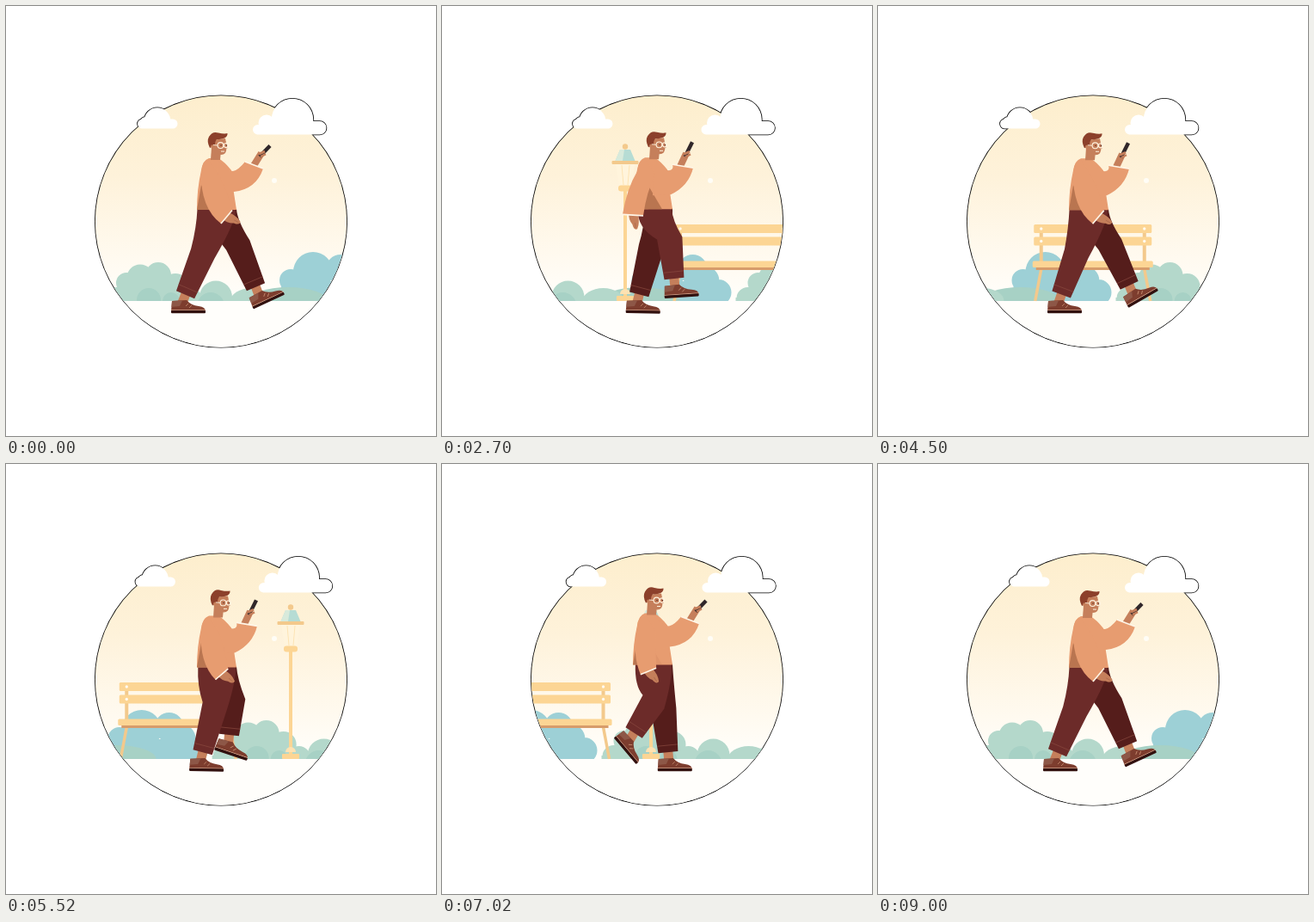
Animation, 500 px wide and 500 px high, one loop 9.03 s. Source, as an HTML page with a canvas:

```html
<!DOCTYPE html>
<html lang="en">
<head>
<meta charset="utf-8">
<title>Walk in the park</title>
<style>
html, body { margin: 0; width: 100%; height: 100%; overflow: hidden; background: #fff; }
canvas { display: block; width: 500px; height: 500px; }
</style>
</head>
<body>
<canvas id="stage" width="500" height="500"></canvas>
<script>
const ctx = document.getElementById('stage').getContext('2d');
const LOOP = 9030, STEP = 30, SPAN = 9, TAU = Math.PI * 2;
const C = {
  blue: '#9dd0d6', green: '#b4d8cb', moss: '#a7d1c5',
  wood: '#fcd594', woodDark: '#d79c6b', post: '#f3c98c',
  skin: '#c57f5b', hair: '#8c402b', knit: '#e79c70', shade: '#b97550',
  near: '#6c2b29', far: '#551d1b', shoe: '#7d3d2e', sole: '#32110f', cuff: '#fff6e8'
};

// phase, knee x, knee y, ankle x, ankle y, foot angle
const NEAR = [
  [0, 229, 288, 205, 344, 0],
  [.08, 231, 282, 203, 332, 42],
  [.22, 246, 277, 218, 320, 50],
  [.376, 265, 270, 271, 326, -4],
  [.47, 270, 277, 296, 333, -30],
  [.5, 270, 278, 294, 335, -25],
  [.58, 266, 281, 297, 340, -12],
  [.72, 258, 285, 264, 344, 0],
  [.88, 243, 281, 226, 344, 1],
  [.97, 231, 288, 210, 344, 0]
];
const FAR = NEAR.map((row, i) => i === 3 ? [.38, 264, 272, 259, 324, 18] : row);

const LAMPS = [
  { keys: [[0, 416], [1.23, 299], [2.7, 213], [4.5, 84]], lift: 3 },
  { keys: [[4.5, 416], [5.52, 331], [7.02, 243], [9, 84]], lift: 0 }
];

const mix = (a, b, k) => a + (b - a) * k;
const mixAll = (a, b, k) => a.map((v, i) => mix(v, b[i], k));
const smooth = (a, b, t) => {
  const k = Math.min(1, Math.max(0, (t - a) / (b - a)));
  return k * k * (3 - 2 * k);
};

function fill(color, draw) {
  ctx.beginPath();
  draw();
  ctx.fillStyle = color;
  ctx.fill();
}
function line(color, width, ...p) {
  ctx.beginPath();
  ctx.moveTo(p[0], p[1]);
  for (let i = 2; i < p.length; i += 2) ctx.lineTo(p[i], p[i + 1]);
  ctx.strokeStyle = color;
  ctx.lineWidth = width;
  ctx.stroke();
}
function poly(color, ...p) {
  fill(color, () => {
    for (let i = 0; i < p.length; i += 2) ctx.lineTo(p[i], p[i + 1]);
    ctx.closePath();
  });
}
function dot(x, y, r) {
  ctx.moveTo(x + r, y);
  ctx.arc(x, y, r, 0, TAU);
}
// half circle standing on a column that ends at the given floor
function hump(x, y, r, floor) {
  ctx.moveTo(x - r, floor);
  ctx.arc(x, y, r, Math.PI, TAU);
  ctx.lineTo(x + r, floor);
  ctx.closePath();
}
const disc = (color, x, y, r) => fill(color, () => dot(x, y, r));
const box = (color, x, y, w, h, r = 0) => fill(color, () => ctx.roundRect(x, y, w, h, r));
const dome = (color, x, rx, ry) =>
  fill(color, () => ctx.ellipse(x, 343, rx, ry, 0, Math.PI, TAU));

// smooth periodic curve through the rows of a pose table
function pose(rows, phase) {
  const n = rows.length;
  const at = i => {
    const turn = Math.floor(i / n), r = rows[i - turn * n];
    return [r[0] + turn, ...r.slice(1)];
  };
  const p = phase - Math.floor(phase);
  let i = 0;
  while (i < n - 1 && rows[i + 1][0] <= p) i++;
  const [a, b, c, d] = [at(i - 1), at(i), at(i + 1), at(i + 2)];
  const h = c[0] - b[0], k = (p - b[0]) / h;
  return [1, 2, 3, 4, 5].map(j => {
    const m0 = (c[j] - a[j]) / (c[0] - a[0]) * h;
    const m1 = (d[j] - b[j]) / (d[0] - b[0]) * h;
    const k2 = k * k, k3 = k2 * k;
    return (2 * k3 - 3 * k2 + 1) * b[j] + (k3 - 2 * k2 + k) * m0 +
      (3 * k2 - 2 * k3) * c[j] + (k3 - k2) * m1;
  });
}

function smallCloud(x) {
  ctx.roundRect(x, 131.5, 46.5, 11, 5.5);
  hump(x + 23, 133.5, 15.3, 142.5);
  dot(x + 9, 135, 6);
}
function bigCloud(x) {
  ctx.roundRect(x, 138, 30, 11.5, 5.7);
  ctx.roundRect(x + 45, 134, 40.5, 15.5, 7.7);
  dot(x + 16, 136, 9.5);
  hump(x + 46, 132, 24.3, 149.5);
  ctx.rect(x + 14, 138, 10, 11.5);
}

function bushes(x) {
  ctx.save();
  ctx.translate(x, 0);
  ctx.beginPath();
  ctx.rect(100, 270, 350, 73);
  ctx.clip();
  fill(C.blue, () => {
    dot(331, 319, 13); dot(357, 309, 23); dot(389, 306, 17);
    dot(402, 320, 18); dot(419, 333, 15);
    ctx.rect(320, 320, 92, 24);
  });
  dome(C.moss, 328, 46, 16);
  fill(C.green, () => {
    dot(128, 340, 13); dot(140, 322, 12); dot(156, 316, 15.5);
    dot(177, 313, 15); dot(197, 326, 15); dot(215, 341, 13);
    ctx.rect(130, 322, 80, 22);
    ctx.rect(114, 339, 186, 5);
  });
  fill(C.moss, () => { dot(166, 342, 14); dot(192, 343, 10); });
  disc(C.green, 244, 338.5, 19);
  disc(C.moss, 238, 349, 16);
  dome(C.green, 285, 24, 15);
  ctx.restore();
}

function lamp({ keys, lift }, t) {
  const i = keys.findIndex((k, n) => n < 3 && t >= k[0] && t < keys[n + 1][0]);
  if (i < 0) return;
  const [a, b] = [keys[i], keys[i + 1]];
  ctx.save();
  ctx.translate(mix(a[1], b[1], (t - a[0]) / (b[0] - a[0])), 0);
  box(C.wood, -2, 214, 4, 124);
  ctx.translate(0, -lift);
  disc(C.post, 0, 166.5, 3.2);
  poly('#b6dcd4', -6, 170, 6, 170, 11.5, 183, -11.5, 183);
  poly('#d8eadb', -6, 170, -1, 170, -3, 183, -11.5, 183);
  poly('#fff4dc', -11, 187, 11, 187, 7, 212, -7, 212);
  line('#fde4b4', 1, -4, 188, -2, 211);
  line('#fde4b4', 1, 5, 188, 3, 211);
  box(C.post, -15.5, 183, 31, 4, 1);
  box(C.wood, -8, 211.5, 16, 7, 3);
  ctx.translate(0, lift);
  fill('#fde2b2', () => ctx.arc(0, 335, 6, Math.PI, TAU));
  box(C.wood, -10, 337, 20, 6, 1);
  ctx.restore();
}

function bench(x) {
  ctx.save();
  ctx.translate(x, 0);
  for (const [px, foot] of [[9, 2], [129, 136]]) {
    line(C.post, 4, px, 255, px, 298);
    line(C.post, 3.5, px, 306, foot, 343);
  }
  for (const y of [254, 268.5]) {
    box(C.wood, .5, y, 137, 10, 1.5);
    disc('#fffaf0', 9, y + 5, 1.7);
    disc('#fffaf0', 129, y + 5, 1.7);
  }
  box(C.woodDark, 3, 303, 132, 4);
  box(C.wood, -1, 296.5, 140, 7.5, 1.5);
  ctx.restore();
}

function leg(rows, phase, color, hip, bob) {
  const [kx, ky, ax, ay, ang] = pose(rows, phase);
  const len = Math.hypot(ax - kx, ay - ky);
  const ux = (ax - kx) / len, uy = (ay - ky) / len;
  const hx = ax - ux * 9, hy = ay - uy * 9;
  line(C.skin, 11, hx - ux * 2, hy - uy * 2, ax, ay + 1);

  ctx.save();
  ctx.translate(ax, ay);
  ctx.rotate(ang * Math.PI / 180);
  fill(C.shoe, () => {
    ctx.moveTo(-13, 11);
    ctx.lineTo(-12, -1);
    ctx.lineTo(5, -2);
    ctx.quadraticCurveTo(10, 4, 19, 5);
    ctx.quadraticCurveTo(27, 6, 27, 11);
  });
  poly('#8d5747', -12, -1, 0, -1.5, -3, 5, -12.5, 6);
  line('#c98f72', .8, 7, 2, 4, 5);
  line('#c98f72', .8, 11, 4, 8, 7);
  line('#e3b79d', .8, -13, 9.7, 27, 9.7);
  box(C.sole, -13, 10, 40, 3.2, 1);
  ctx.restore();

  // point at w to one side of the shin
  const side = (x, y, w) => [x + uy * w, y - ux * w];
  const [l, r] = hip, ht = 235 + bob;
  fill(color, () => {
    ctx.moveTo(l, ht);
    ctx.lineTo(r, ht);
    ctx.quadraticCurveTo(r + 1, 250, ...side(kx, ky, 14.5));
    ctx.lineTo(...side(hx, hy, 11.5));
    ctx.lineTo(...side(hx, hy, -11.5));
    ctx.lineTo(...side(kx, ky, -15));
    ctx.quadraticCurveTo(l - 1, 258, l, ht);
  });
  const sx = hx - ux * 8, sy = hy - uy * 8;
  line('#8a4a40', .7, ...side(sx, sy, 12), ...side(sx, sy, -12));
}

function torso(swing) {
  fill(C.knit, () => {
    ctx.moveTo(236, 176);
    ctx.quadraticCurveTo(229, 178, 227, 190);
    ctx.quadraticCurveTo(222, 212, 222, 236);
    ctx.lineTo(268, 236);
    ctx.lineTo(264, 210);
    ctx.lineTo(262, 190);
    ctx.quadraticCurveTo(254, 180, 247, 176);
  });
  poly(C.shade, 227, 207, 222, 236, 240, 236);
  ctx.globalAlpha = Math.min(1, Math.max(0, 1 - swing * 1.6));
  poly(C.shade, 239, 207, 233, 236, 256, 236);
  ctx.globalAlpha = 1;
}

function phoneArm(reach) {
  const [ax, ay, bx, by, cx, cy, dx, dy, ex, ey, fx, fy, gx, gy] = mixAll(
    [268, 184, 292, 188, 287, 209, 266, 219, 277, 186, 284, 171, 291, 158],
    [278, 180, 299, 188, 291, 212, 265, 215, 287, 186, 297, 170, 307, 161.5], reach);
  line(C.skin, 8, ex, ey, fx, fy);
  line('#30272a', 4.4, mix(fx, gx, -.2), fy + 4, gx, gy);
  line(C.skin, 3, fx - 3, fy + 1, fx + 4, fy - 2);
  line(C.skin, 2.4, fx - 1, fy + 4, fx + 5, fy + 1);
  fill(C.knit, () => {
    ctx.moveTo(246, 177);
    ctx.quadraticCurveTo(257, 191, 264, 191);
    ctx.quadraticCurveTo(270, 190, ax, ay);
    ctx.lineTo(bx, by);
    ctx.quadraticCurveTo(cx, cy, dx, dy);
    ctx.lineTo(245, 220);
  });
  line(C.cuff, 1.6, ax, ay, bx, by);
}

function head(shift) {
  ctx.save();
  ctx.translate(shift, -1);
  poly(C.skin, 239, 164, 250, 168, 249, 179, 238, 179);
  fill(C.skin, () => {
    ctx.moveTo(238, 156);
    ctx.lineTo(255, 154);
    ctx.quadraticCurveTo(258, 166, 255, 171);
    ctx.quadraticCurveTo(251, 175, 244, 171);
    ctx.quadraticCurveTo(238, 168, 238, 156);
  });
  poly(C.skin, 255, 160, 258, 165, 255, 166);
  fill(C.hair, () => {
    ctx.moveTo(237, 165);
    ctx.quadraticCurveTo(233, 157, 236, 152);
    ctx.quadraticCurveTo(240, 145, 247, 147.5);
    ctx.quadraticCurveTo(254, 149, 257.5, 148);
    ctx.quadraticCurveTo(258, 155, 245, 155);
    ctx.quadraticCurveTo(243, 157, 243, 162);
  });
  disc(C.skin, 240.5, 163.5, 2.4);
  ctx.strokeStyle = '#fff3df';
  ctx.lineWidth = 1.1;
  for (const [x, r] of [[249.5, 3.4], [256, 2.6]]) {
    ctx.beginPath();
    dot(x, 162, r);
    ctx.stroke();
    disc('#4a1d18', x + .5, 162, .7);
  }
  line('#fff3df', .9, 241, 161.5, 246, 162);
  line('#fff3df', 1, 250, 169, 254, 169);
  ctx.restore();
}

function nearArm(swing) {
  const [lx, ly, rx, ry, qx, qy, ang] = mixAll(
    [210, 242, 234, 243.5, 215, 212, -3],
    [250, 252, 263, 236.5, 226, 234, 50], swing);
  ctx.save();
  ctx.translate((lx + rx) / 2, (ly + ry) / 2);
  ctx.rotate(-ang * Math.PI / 180);
  fill(C.skin, () => {
    ctx.moveTo(-5, -3);
    ctx.lineTo(5, -3);
    ctx.quadraticCurveTo(9, 8, 6, 16);
    ctx.quadraticCurveTo(2, 18, 0, 11);
    ctx.quadraticCurveTo(-5, 6, -5, -3);
  });
  line('#a9674a', .7, 3, 9, 4, 15);
  ctx.restore();
  fill(C.knit, () => {
    ctx.moveTo(236, 177);
    ctx.quadraticCurveTo(228, 179, 227, 192);
    ctx.quadraticCurveTo(qx, qy, lx, ly);
    ctx.lineTo(rx, ry);
    ctx.quadraticCurveTo(mix(238, 258, swing), 215, 248, 196);
  });
  line(C.cuff, 1.6, lx, ly, rx, ry);
}

function walker(t) {
  const phase = 8 * t / SPAN - .03 * Math.sin(Math.PI * t / SPAN);
  const bob = 1.9 * Math.cos(2 * TAU * (phase + .04)) - .6;
  const swing = (Math.cos(TAU * phase) + .71) / 1.71;
  const near = smooth(1.4, 2.3, t) - smooth(5.8, 6.7, t);
  leg(FAR, phase + .5, C.far, [236, 268], bob);
  leg(NEAR, phase, C.near, [222.5 + 5 * (1 - swing), 267], bob);
  ctx.save();
  ctx.translate(0, bob);
  torso(swing);
  phoneArm(1 - near);
  head(3 * near);
  nearArm(swing);
  ctx.restore();
}

const sky = ctx.createLinearGradient(0, 103, 0, 343);
sky.addColorStop(0, '#fdeecd');
sky.addColorStop(.4, '#fef2da');
sky.addColorStop(.8, '#fffaf0');
sky.addColorStop(1, '#fffefb');

const disk = () => dot(250, 250.5, 146.2);

function draw(t) {
  const smallX = 142 + 5.5 * (1 + Math.cos(TAU * t / 3));
  const bigX = 287 + 8 * (1 - Math.cos(TAU * t / 4.5));
  const clouds = [() => smallCloud(smallX), () => bigCloud(bigX)];
  ctx.clearRect(0, 0, 500, 500);

  // dark rim around the joined outline of circle and clouds
  ctx.strokeStyle = '#000';
  ctx.lineWidth = 1.6;
  for (const shape of [disk, ...clouds]) {
    ctx.beginPath();
    shape();
    ctx.stroke();
  }

  ctx.save();
  ctx.beginPath();
  disk();
  ctx.clip();
  ctx.fillStyle = sky;
  ctx.fillRect(100, 100, 300, 300);
  disc('#fffdf6', 312, 203, 3);
  const drift = -325 * t / SPAN;
  bushes(drift);
  bushes(drift + 325);
  LAMPS.forEach(l => lamp(l, t));
  bench(399 - 48.5 * t);
  box('#fffefb', 100, 343.5, 300, 60);
  walker(t);
  ctx.restore();

  clouds.forEach(shape => fill('#fff', shape));
}

const start = performance.now();
function tick() {
  const ms = (performance.now() - start) % LOOP;
  draw(Math.floor(ms / STEP) * STEP / 1000);
  requestAnimationFrame(tick);
}
tick();
</script>
</body>
</html>
```
